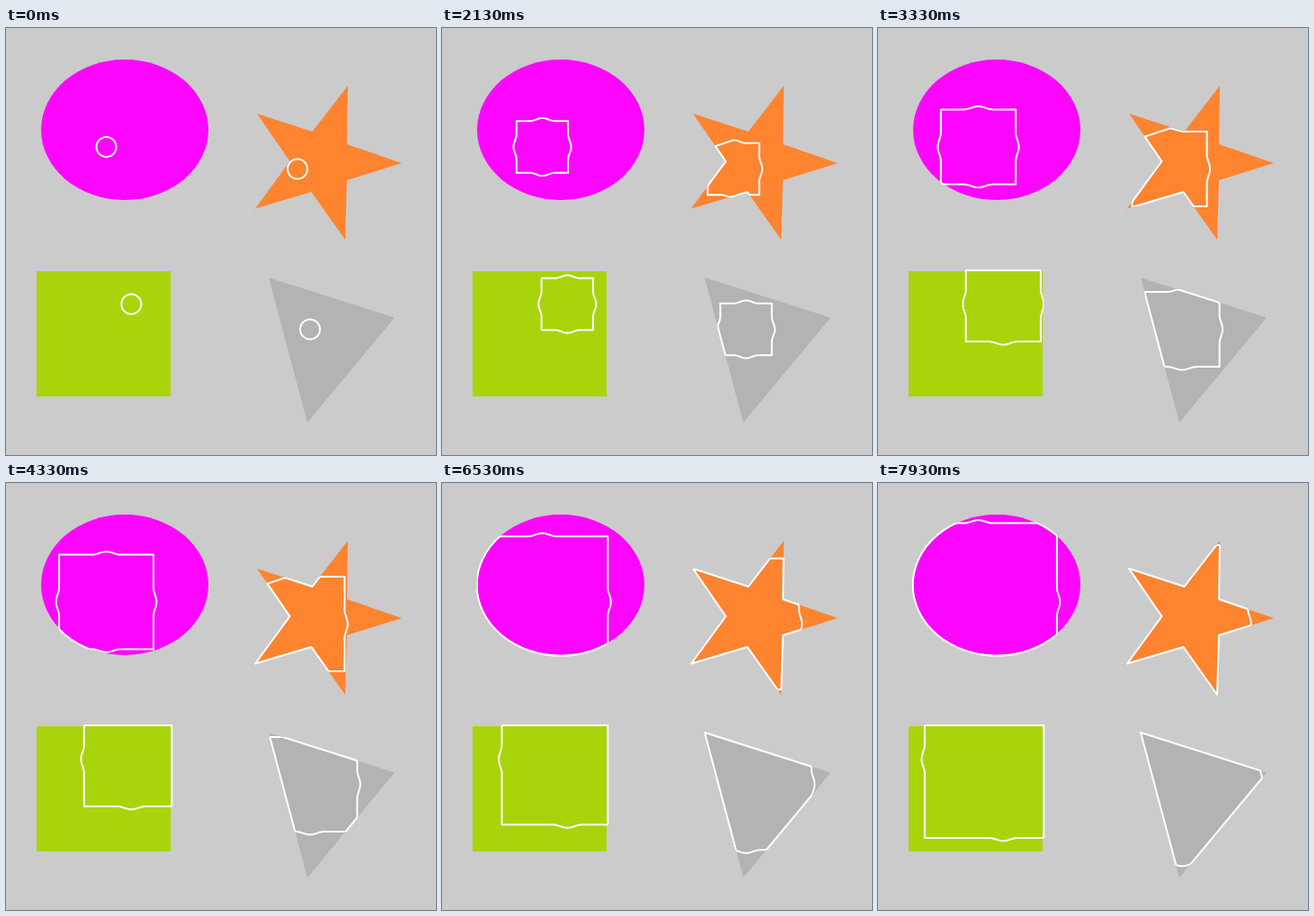
Write an HTML page with a canvas that moves like this. It is 478 px wide and 474 px high and loops after 8 s.

```html
<!DOCTYPE html>
<html lang="en">
<head>
<meta charset="utf-8">
<title>Growing contours</title>
<style>
  html, body { margin: 0; width: 100%; height: 100%; overflow: hidden; background: #cbcbcb; }
  canvas { display: block; }
</style>
</head>
<body>
<canvas id="stage" width="478" height="474"></canvas>
<script>
const ctx = document.getElementById('stage').getContext('2d');
const LOOP = 8000, FRAME = 1000 / 15, START_RADIUS = 11, BULGE = 3.4;

// [time in ms, radius]: near-steady growth with one slower stretch
const GROWTH = [[300, START_RADIUS], [2130, 32], [4330, 55.8], [5600, 66.5], [LOOP, 91.5]];

function polygon(points) {
  const path = new Path2D();
  points.forEach(([x, y]) => path.lineTo(x, y));
  path.closePath();
  return path;
}

function ellipse(x, y, rx, ry) {
  const path = new Path2D();
  path.ellipse(x, y, rx, ry, 0, 0, 2 * Math.PI);
  return path;
}

function rect(x, y, w, h) {
  const path = new Path2D();
  path.rect(x, y, w, h);
  return path;
}

const star = polygon([[279, 95], [340.5, 115], [380, 64], [379, 129], [440, 150],
  [379, 169], [377, 235], [339.5, 182], [277, 200.5], [315.5, 148]]);
const triangle = polygon([[292, 277], [432, 321.5], [335, 438]]);

// filled area, edge the contour sticks to, colour, seed point
const shapes = [
  { area: ellipse(132, 113, 93, 78), edge: ellipse(132, 113.2, 93.3, 78.5), color: '#fd06ff', seed: [111.5, 132] },
  { area: star, edge: star, color: '#ff8430', seed: [324, 156.5], slanted: true },
  { area: rect(34, 270, 149, 139), edge: rect(33, 269, 151.3, 141), color: '#a9d40a', seed: [139.3, 306.5] },
  { area: triangle, edge: triangle, color: '#b3b3b3', seed: [338, 334.5] }
];

function radiusAt(t) {
  if (t <= GROWTH[0][0]) return START_RADIUS;
  const i = GROWTH.findIndex(([time]) => time > t);
  const [t0, r0] = GROWTH[i - 1], [t1, r1] = GROWTH[i];
  return r0 + (r1 - r0) * (t - t0) / (t1 - t0);
}

// A circle that turns into a square with a small bulge on each side
function front(r, [cx, cy], slanted) {
  const half = r - BULGE;
  const width = Math.min(16, half / 2);
  const squareness = Math.min(1, (r - START_RADIUS) / 13);
  const count = Math.ceil(half);
  const points = [];
  for (let side = 0; side < 4; side++) {
    for (let i = -count; i < count; i++) {
      const u = half * i / count;
      const lift = Math.abs(u) < width ? BULGE / 2 * (1 + Math.cos(Math.PI * u / width)) : 0;
      let x = u, y = -half - lift;
      for (let k = 0; k < side; k++) [x, y] = [-y, x];
      const scale = squareness + (1 - squareness) * r / Math.hypot(x, y);
      x *= scale;
      y *= scale;
      // the star's inner corner holds back the upper left of the front
      if (slanted) y = Math.max(y, -r - 0.33 * x * squareness);
      points.push([cx + x, cy + y]);
    }
  }
  return polygon(points);
}

function strokeInside(line, region) {
  ctx.save();
  ctx.clip(region);
  ctx.stroke(line);
  ctx.restore();
}

function draw(now) {
  const t = Math.floor(now % LOOP / FRAME + 0.1) * FRAME;
  const r = radiusAt(Math.min(t, LOOP - 1));
  ctx.fillStyle = '#cbcbcb';
  ctx.fillRect(0, 0, 478, 474);
  ctx.strokeStyle = '#fff';
  ctx.lineWidth = 2;
  ctx.lineJoin = 'round';
  for (const { area, edge, color, seed, slanted } of shapes) {
    ctx.fillStyle = color;
    ctx.fill(area);
    const grown = front(r, seed, slanted);
    strokeInside(grown, edge);
    strokeInside(edge, grown);
  }
}

const began = performance.now();
function tick() {
  draw(performance.now() - began);
  requestAnimationFrame(tick);
}
tick();
</script>
</body>
</html>
```
